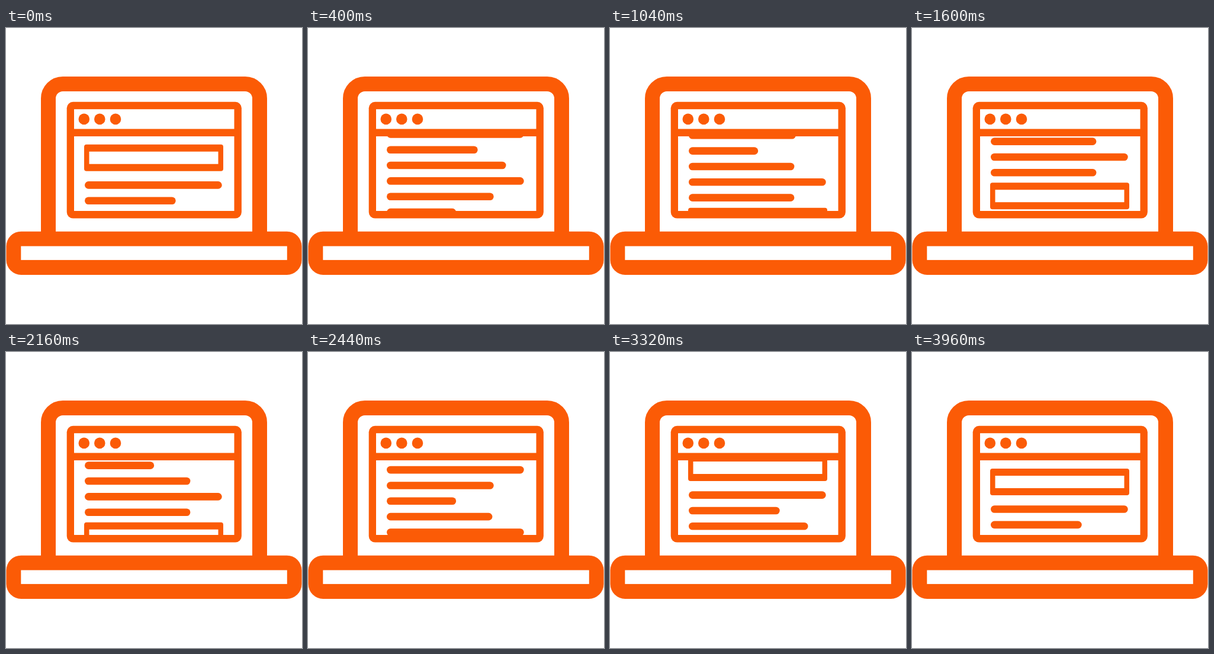
Write an HTML page that moves like this. It is 500 px wide and 500 px high and loops after 4 s.

```html
<!DOCTYPE html>
<html lang="en">
<head>
<meta charset="utf-8">
<title>Laptop with scrolling page</title>
<style>
  html, body { margin: 0; width: 100%; height: 100%; overflow: hidden; background: #fff; }
  svg { display: block; width: 100%; height: 100%; }
</style>
</head>
<body>
<svg viewBox="0 0 500 500" fill="#fb5b06">
  <defs>
    <clipPath id="viewport"><rect x="115" y="180" width="271" height="132"/></clipPath>
    <path id="field" fill-rule="evenodd"
      d="M136 197H363a4 4 0 0 1 4 4V238a4 4 0 0 1-4 4H136a4 4 0 0 1-4-4V201a4 4 0 0 1 4-4ZM140.5 209V230H358.5V209Z"/>
  </defs>

  <!-- Lid and base -->
  <path d="M71.5 350V119a24.5 24.5 0 0 1 24.5-24.5H404a24.5 24.5 0 0 1 24.5 24.5V350"
    fill="none" stroke="#fb5b06" stroke-width="25"/>
  <rect x=".5" y="343.7" width="499" height="73.2" rx="25"/>
  <rect x="25.3" y="368.5" width="449.5" height="23.4" fill="#fff"/>

  <!-- Browser window -->
  <rect x="102.7" y="124.8" width="295.2" height="196.8" rx="10.5"/>
  <rect x="115" y="137.2" width="270.5" height="33.3" fill="#fff"/>
  <rect x="115" y="183" width="270.5" height="126" fill="#fff"/>
  <circle cx="131.8" cy="153.9" r="9.3"/>
  <circle cx="158.3" cy="153.9" r="9.3"/>
  <circle cx="185" cy="153.9" r="9.3"/>

  <g clip-path="url(#viewport)">
    <g id="page">
      <use href="#field"/>
      <use href="#field" y="296.4"/>
    </g>
  </g>
</svg>
<script>
  const LOOP = 4000;
  const SCROLL = 240;
  const lineEnds = [364.7, 286.7, 334.5, 364.7, 313.7, 250.2, 311.4, 364.7, 311.4];
  const page = document.getElementById("page");

  lineEnds.forEach((end, i) => {
    const line = document.createElementNS("http://www.w3.org/2000/svg", "rect");
    const box = { x: 133, y: 259.3 + 26.35 * i, width: end - 133, height: 12.6, rx: 6.3 };
    for (const name in box) line.setAttribute(name, box[name]);
    page.append(line);
  });

  const bezier = (a, b, s) => 3 * a * s * (1 - s) ** 2 + 3 * b * s * s * (1 - s) + s ** 3;

  function ease(x) {
    let low = 0, high = 1;
    for (let i = 0; i < 24; i++) {
      const mid = (low + high) / 2;
      if (bezier(0.2, 0.465, mid) < x) low = mid; else high = mid;
    }
    return bezier(0.335, 1, low);
  }

  // Scroll down in the first half of the loop, back up in the second.
  function draw() {
    const phase = (performance.now() % LOOP) / LOOP * 2;
    const amount = phase < 1 ? ease(phase) : 1 - ease(phase - 1);
    page.setAttribute("transform", `translate(0 ${-SCROLL * amount})`);
    requestAnimationFrame(draw);
  }
  draw();
</script>
</body>
</html>
```
